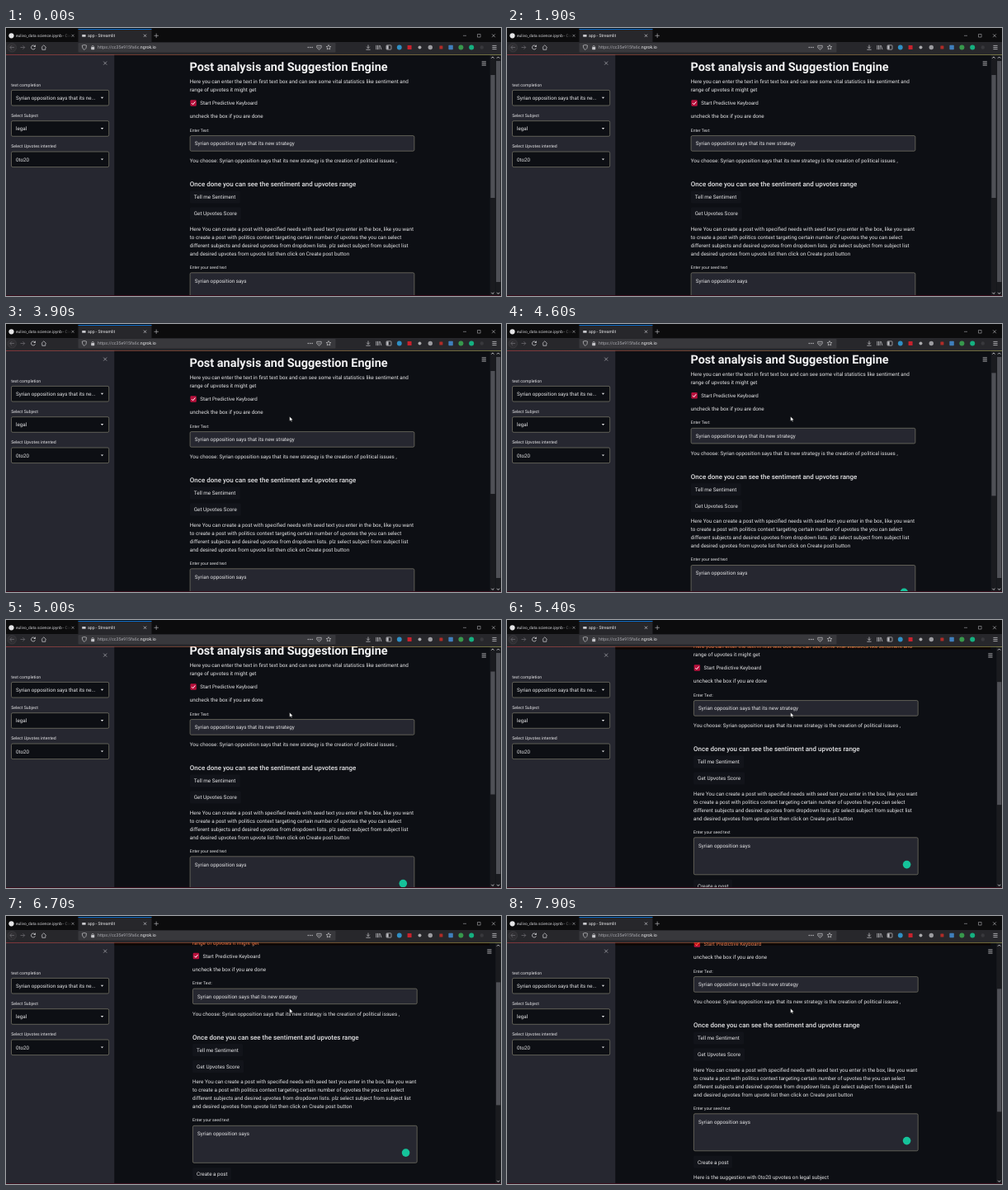
Animation of 600x325 px, one loop 8000 ms. Source, as an HTML page with a canvas:

```html
<!DOCTYPE html>
<html lang="en">
<head>
<meta charset="utf-8">
<title>Post analysis</title>
<style>
  html, body { margin: 0; width: 100%; height: 100%; overflow: hidden; background: #0d0f14; }
  canvas { display: block; width: 600px; height: 325px; }
</style>
</head>
<body>
<canvas id="stage"></canvas>
<script>
const W = 600, H = 325, LOOP = 8000, STEP = 100, TOP = 32;
const canvas = document.getElementById('stage');
const ratio = window.devicePixelRatio || 1;
canvas.width = W * ratio;
canvas.height = H * ratio;
const ctx = canvas.getContext('2d');

const PAGE = '#0d0f14', PANEL = '#262730', EDGE = '#7d7b6c', INK = '#e4e4e6';
const BAR = '#27272b', ICON = '#c4c4c8', BODY = 6.33;
// time in ms, page scroll in px
const scrollKeys = [[4300, 0], [5000, 10], [5400, 33], [6700, 42.5], [7900, 57]];
const WIDEN_AT = 5200, POINTER_AT = 3700;

function scrollAt(t) {
  if (t <= scrollKeys[0][0]) return 0;
  for (let i = 1; i < scrollKeys.length; i++) {
    const [t0, s0] = scrollKeys[i - 1], [t1, s1] = scrollKeys[i];
    if (t <= t1) return s0 + (s1 - s0) * (t - t0) / (t1 - t0);
  }
  return scrollKeys[scrollKeys.length - 1][1];
}

function rect(x, y, w, h, fill) {
  ctx.fillStyle = fill;
  ctx.fillRect(x, y, w, h);
}

function box(x, y, w, h, r, fill, stroke, line = 0.7) {
  ctx.beginPath();
  ctx.roundRect(x, y, w, h, r);
  if (fill) { ctx.fillStyle = fill; ctx.fill(); }
  if (stroke) { ctx.strokeStyle = stroke; ctx.lineWidth = line; ctx.stroke(); }
}

function dot(x, y, r, fill) {
  ctx.beginPath();
  ctx.arc(x, y, r, 0, Math.PI * 2);
  ctx.fillStyle = fill;
  ctx.fill();
}

function path(points, color, line = 0.75) {
  ctx.beginPath();
  points.forEach(([x, y], i) => i ? ctx.lineTo(x, y) : ctx.moveTo(x, y));
  ctx.strokeStyle = color;
  ctx.lineWidth = line;
  ctx.stroke();
}

function shape(points, fill) {
  ctx.beginPath();
  points.forEach(([x, y]) => ctx.lineTo(x, y));
  ctx.closePath();
  ctx.fillStyle = fill;
  ctx.fill();
}

// Type is set at four times its size and scaled down for even spacing.
function text(str, x, y, size = BODY, weight = 400, color = INK) {
  ctx.save();
  ctx.translate(x, y);
  ctx.scale(0.25, 0.25);
  ctx.font = `${weight} ${size * 4}px Roboto, Arial, sans-serif`;
  ctx.textRendering = 'geometricPrecision';
  ctx.fillStyle = color;
  ctx.fillText(str, 0, 0);
  const width = ctx.measureText(str).width / 4;
  ctx.restore();
  return x + width;
}

function cross(x, y, r, color, line) {
  path([[x - r, y - r], [x + r, y + r]], color, line);
  path([[x + r, y - r], [x - r, y + r]], color, line);
}

function menu(x, y, r, color) {
  for (const d of [-2.1, 0, 2.1]) path([[x - r, y + d], [x + r, y + d]], color, 0.8);
}

function tabs() {
  rect(0, 0, W, 17, '#0c0c0d');
  dot(6.5, 9.3, 3.1, '#e4e4e6');
  text('eulivo_data science.ipynb - Co', 12, 11.1, 4.9, 400, '#d0d0d4');
  const cover = ctx.createLinearGradient(68, 0, 77, 0);
  cover.addColorStop(0, 'rgba(12,12,13,0)');
  cover.addColorStop(1, '#0c0c0d');
  rect(68, 3, 9.5, 12, cover);
  cross(81, 9.3, 1.5, '#b8b8bc', 0.6);

  rect(87.5, 1, 89, 16, BAR);
  rect(87.5, 1, 89, 1, '#0a6fd0');
  box(92.2, 7.9, 4.4, 2.8, 0.5, '#c9c9cd');
  text('app - Streamlit', 99, 11.1, 5.15, 400, '#e8e8ea');
  cross(168.5, 9.3, 1.6, '#d0d0d4', 0.7);
  path([[179.5, 9.3], [184.9, 9.3]], ICON, 0.6);
  path([[182.2, 6.6], [182.2, 12]], ICON, 0.6);

  path([[554, 9.3], [558, 9.3]], ICON, 0.5);
  box(571.5, 7.5, 3.6, 3.6, 0, null, ICON, 0.5);
  cross(591, 9.3, 1.9, ICON, 0.6);
}

function toolbar() {
  rect(0, 17, W, 15, BAR);
  const y = 23.5;

  box(2, y - 5, 10.5, 10.5, 5.2, '#302f33', '#454449', 0.5);
  const dim = '#6c6b70';
  path([[10, y], [4.8, y]], dim);
  path([[7, y - 2.2], [4.8, y], [7, y + 2.2]], dim);
  path([[17.5, y], [22.7, y]], dim);
  path([[20.5, y - 2.2], [22.7, y], [20.5, y + 2.2]], dim);
  ctx.beginPath();
  ctx.arc(33, y, 2.5, 0.3, 5.4);
  ctx.strokeStyle = ICON;
  ctx.lineWidth = 0.8;
  ctx.stroke();
  shape([[35.8, y - 3.2], [35.8, y - 0.5], [33.2, y - 0.5]], ICON);
  path([[42.8, y + 0.2], [45.8, y - 2.7], [48.8, y + 0.2]], ICON);
  path([[43.8, y], [43.8, y + 2.8], [47.8, y + 2.8], [47.8, y]], ICON);

  box(87.5, 18, 312, 11.5, 1.2, '#38383c');
  path([[92.3, y - 2.4], [95, y - 3], [97.5, y - 2.4], [97, y + 1], [95, y + 3], [92.8, y + 1], [92.3, y - 2.4]], ICON, 0.7);
  box(103.2, y - 0.5, 4, 3.2, 0.4, ICON);
  ctx.beginPath();
  ctx.arc(105.2, y - 0.7, 1.3, Math.PI, 0);
  ctx.strokeStyle = ICON;
  ctx.lineWidth = 0.7;
  ctx.stroke();
  const end = text('https://cc35e915fa6c.', 111, 25.4, 5.25, 400, '#aaaab0');
  text('ngrok.io', end, 25.4, 5.25, 400, '#ececee');

  for (const x of [366.3, 368.7, 371.1]) dot(x, y, 0.7, ICON);
  path([[376.8, y - 2.2], [382.2, y - 2.2], [382.2, y + 0.5], [379.5, y + 2.8], [376.8, y + 0.5], [376.8, y - 2.2]], ICON, 0.7);
  path([[378.1, y - 0.6], [379.5, y + 0.7], [380.9, y - 0.6]], ICON, 0.7);
  const star = [];
  for (let i = 0; i <= 10; i++) {
    const a = i * Math.PI / 5 - Math.PI / 2, r = i % 2 ? 1.4 : 3;
    star.push([391 + r * Math.cos(a), y + r * Math.sin(a)]);
  }
  path(star, ICON, 0.7);

  path([[439, y - 3], [439, y + 1]], ICON);
  path([[437.2, y - 0.8], [439, y + 1], [440.8, y - 0.8]], ICON);
  path([[436.4, y + 2.7], [441.6, y + 2.7]], ICON);
  for (const x of [448.8, 450.5, 452.2]) path([[x, y - 2.6], [x, y + 2.7]], ICON);
  path([[453.4, y - 2.3], [454.9, y + 2.6]], ICON);
  box(461, y - 2.6, 6, 5.2, 0.8, null, ICON);
  rect(461.4, y - 2.2, 2.2, 4.4, ICON);

  // add-on buttons
  dot(476.8, y, 2.9, '#2f8fc4');
  box(486.6, y - 2.6, 5, 5.2, 0.6, '#c8222d');
  dot(501.5, y, 2, '#a9a9ac');
  dot(514.3, y, 2.7, '#9c9ca0');
  box(525.4, y - 2.1, 4, 4.2, 0.5, '#b02c27');
  box(536.4, y - 2.7, 5.4, 5.4, 0.6, '#3f7fbc');
  dot(551.4, y, 3, '#37984c');
  dot(564.2, y, 3, '#15b080');
  dot(576.8, y, 2.2, '#38383c');
  menu(592, y, 2.6, ICON);
}

function select(label, value, y) {
  text(label, 6.2, y - 4.3, 5.2);
  box(6.5, y + 0.4, 118.2, 18.6, 1.6, PAGE, EDGE);
  text(value, 12, y + 11.9, 6.25);
  shape([[114.8, y + 8.8], [118.2, y + 8.8], [116.5, y + 10.7]], INK);
}

function sidebar() {
  rect(0, TOP, 131.3, H - TOP, PANEL);
  cross(120.2, 42.6, 2, '#a0a0a6', 0.8);
  select('text completion', 'Syrian opposition says that its ne...', 75);
  select('Select Subject', 'legal', 112.3);
  select('Select Upvotes intented', '0to20', 149.6);
}

function button(label, x, y, w) {
  box(x, y - 7.4, w, 14.8, 1.5, '#12141a');
  text(label, x + 5, y + 2.3);
}

function content(x, s) {
  ctx.save();
  ctx.beginPath();
  ctx.rect(131.3, TOP, W - 131.3, H - TOP);
  ctx.clip();
  ctx.translate(x, -s);

  text('Post analysis and Suggestion Engine', -0.4, 51.8, 14.5, 700, '#f2f2f3');
  text('Here you can enter the text in first text box and can see some vital statistics like sentiment and', 0, 67.3);
  text('range of upvotes it might get', 0, 77.4);
  box(0.6, 87.2, 7.4, 7.6, 1.2, '#b8103c');
  path([[2.2, 91.1], [3.8, 92.7], [6.5, 89.4]], '#fff', 1);
  text('Start Predictive Keyboard', 12.4, 93.3, 6.2);
  text('uncheck the box if you are done', 0, 109.3);

  text('Enter Text:', 0, 125.6, 5.05);
  box(0.3, 130.6, 271.8, 18.6, 1.6, PANEL, EDGE);
  text('Syrian opposition says that its new strategy', 6, 142.1, 6.28);
  text('You choose: Syrian opposition says that its new strategy is the creation of political issues ,', 0, 163.2, 6.28);

  text('Once done you can see the sentiment and upvotes range', 0, 192.2, 7.98, 500);
  button('Tell me Sentiment', 0, 205, 61);
  button('Get Upvotes Score', 0, 225, 62);
  [
    'Here You can create a post with specified needs with seed text you enter in the box, like you want',
    'to create a post with politics context targeting certain number of upvotes the you can select',
    'different subjects and desired upvotes from dropdown lists. plz select subject from subject list',
    'and desired upvotes from upvote list then click on Create post button'
  ].forEach((line, i) => text(line, 0, 245.6 + i * 10));

  text('Enter your seed text', 0, 291.7, 5.05);
  box(0.3, 296.8, 271.8, 45, 1.6, PANEL, EDGE);
  text('Syrian opposition says', 6, 308.6, 6.28);
  dot(258.5, 329.6, 4.8, '#15c39a');
  button('Create a post', 0, 355.2, 47);
  text('Here is the suggestion with 0to20 upvotes on legal subject', 0, 376.2);
  ctx.restore();
}

function chevron(x, y, d) {
  path([[x - 1.6, y - d], [x, y + d], [x + 1.6, y - d]], '#d4d4d8', 0.9);
}

function scrollbar(x, thumb, length) {
  rect(x, TOP, 6.7, H - TOP, '#1a1b1f');
  rect(x + 0.8, thumb, 5.2, length, '#4f5056');
  chevron(x + 3.3, 35.8, -0.8);
  chevron(x + 3.3, 321.6, 0.8);
}

// Warms the text that slides under the page's top strip.
function glow() {
  const warm = ctx.createLinearGradient(0, TOP, 0, 36.5);
  warm.addColorStop(0, '#ff6a38');
  warm.addColorStop(0.7, '#ff8450');
  warm.addColorStop(1, '#fff');
  ctx.globalCompositeOperation = 'multiply';
  rect(131.3, TOP, 455, 4.5, warm);
  ctx.globalCompositeOperation = 'source-over';
}

function strip() {
  const across = ctx.createLinearGradient(0, 0, W, 0);
  across.addColorStop(0, '#ff4b4b');
  across.addColorStop(1, '#fffd80');
  ctx.globalAlpha = 0.45;
  rect(0, TOP, W, 0.9, across);
  ctx.globalAlpha = 1;
}

function pointer(x, y) {
  const tip = [[0, 0], [0, 5.6], [1.3, 4.4], [2.2, 6.4], [3.1, 6], [2.2, 4.1], [4, 4]]
    .map(([dx, dy]) => [x + dx, y + dy]);
  shape(tip, '#fff');
  path([...tip, tip[0]], '#000', 0.3);
}

function draw(t) {
  ctx.setTransform(ratio, 0, 0, ratio, 0, 0);
  rect(0, 0, W, H, PAGE);
  const s = scrollAt(t), wide = t >= WIDEN_AT, shift = wide ? 3.3 : 0;
  const thumb = 57 + s * 0.55;
  content(222.8 + shift, s);
  sidebar();
  if (wide) {
    glow();
    scrollbar(593.3, thumb, 149);
  } else {
    scrollbar(593.3, 40, 268);
    scrollbar(586.6, thumb, 149);
  }
  strip();
  menu(579.3 + shift * 2, 43, 2.6, '#c8c8cc');
  rect(0, 324, W, 1, '#3a0e1c');
  toolbar();
  tabs();
  if (t >= POINTER_AT) pointer(343.7, 112.2);
}

function frame(now) {
  const t = now % LOOP;
  draw(Math.floor(t / STEP) * STEP);
  requestAnimationFrame(frame);
}
draw(0);
requestAnimationFrame(frame);
</script>
</body>
</html>
```
